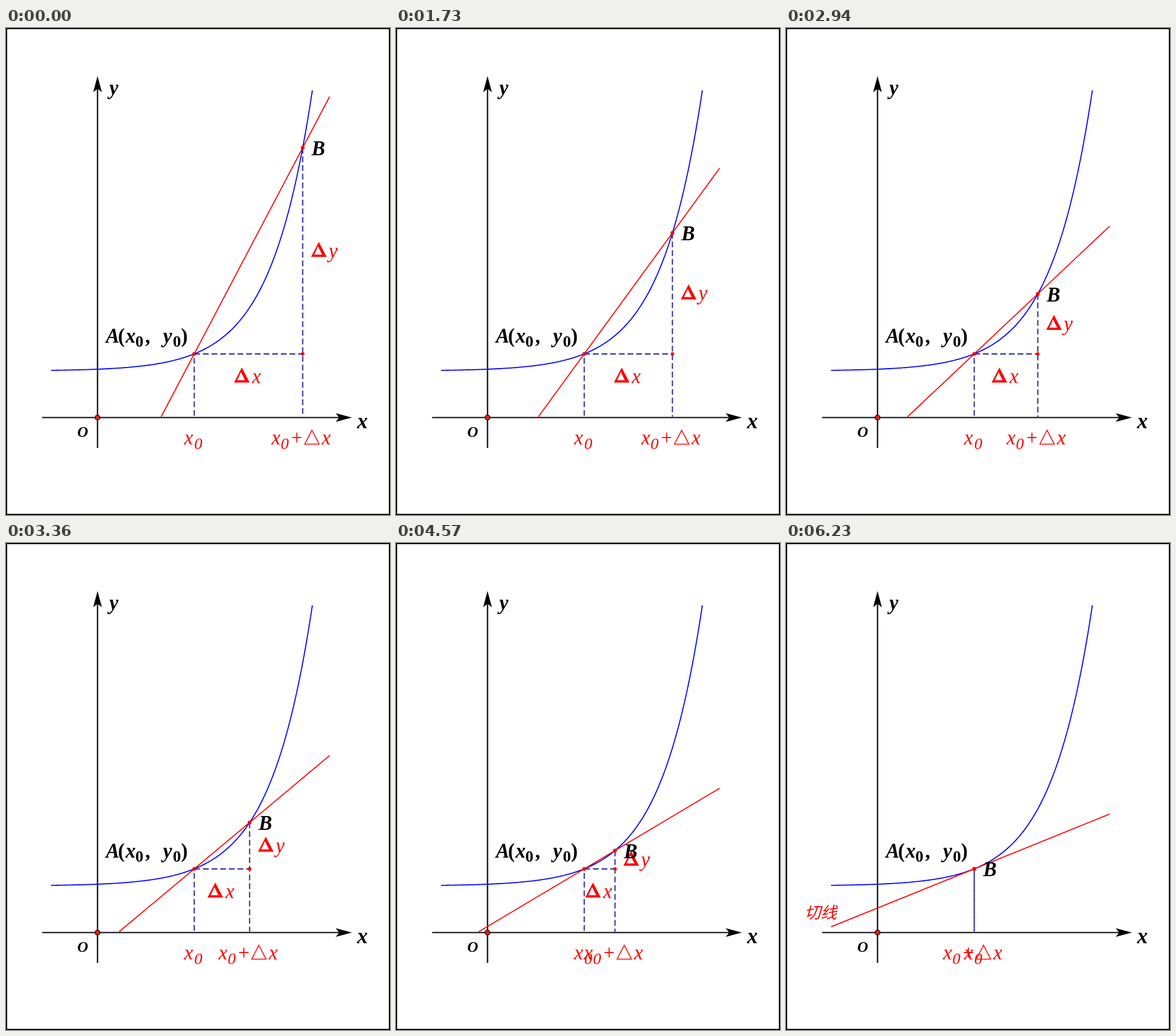
Write an HTML page that moves like this. It is 665 px wide and 842 px high and loops after 6620 ms.

```html
<!DOCTYPE html>
<html lang="zh">
<head>
<meta charset="utf-8">
<title>Secant to tangent</title>
<style>
  html, body { margin: 0; width: 100%; height: 100%; overflow: hidden; background: #fff; }
  svg { display: block; width: 665px; height: 842px; }
  text { font-family: "Liberation Serif", "Times New Roman", serif; font-size: 35px; white-space: pre; }
  .red { fill: #f00; }
  .it { font-style: italic; }
  .bold { font-weight: bold; }
  .sub { font-size: 28px; }
  .big { font-size: 37px; }
  .origin { font-size: 26px; }
  .cjk { font: italic 28px "Noto Sans CJK SC", "Noto Sans CJK", sans-serif; }
  .axis { stroke: #000; stroke-width: 2.2; }
  .line { fill: none; stroke-width: 1.8; }
  .dash { stroke: #4040a4; stroke-width: 2.3; stroke-dasharray: 10 5; }
</style>
</head>
<body>
<svg viewBox="0 0 665 842">
  <defs>
    <path id="delta" class="red" fill-rule="evenodd" d="M0 0L13.500-26L27 0ZM5.500-4H19L12-18Z"/>
  </defs>
  <rect x="1" y="1" width="663" height="840" fill="#fff" stroke="#000" stroke-width="2"/>

  <path id="dropA" class="dash" stroke-dashoffset="7.5" d="M326 563V672"/>
  <path id="dropB" class="dash"/>
  <path id="run" class="dash"/>

  <path class="axis" d="M62.500 673.500H585M158.500 726V100"/>
  <path d="M158.500 83L166 111L158.500 105L151 111Z"/>
  <path d="M599 673.500L571 681L577 673.500L571 666Z"/>

  <path id="curve" class="line" stroke="#00f"/>
  <path id="secant" class="line" stroke="#f00"/>

  <circle class="red" cx="326" cy="563.5" r="3.3"/>
  <circle id="corner" class="red" cy="563.5" r="3"/>
  <circle id="dotB" class="red" r="3.3"/>
  <circle cx="158.500" cy="673.500" r="4.3" fill="#d8201c" stroke="#300" stroke-width="1.3"/>

  <g class="bold">
    <text class="it" x="179" y="115">y</text>
    <text class="it big" x="608" y="692">x</text>
    <text class="it origin" x="123.500" y="707">O</text>
    <text class="it" x="173" y="544">A</text>
    <text x="194" y="544">(</text>
    <text class="it" x="207" y="544">x</text>
    <text class="sub" x="224" y="551">0</text>
    <text x="241" y="544">,</text>
    <text class="it" x="272" y="544">y</text>
    <text class="sub" x="289" y="551">0</text>
    <text x="303" y="544">)</text>
  </g>

  <g class="red">
    <text class="it" x="308.500" y="720">x</text>
    <text class="it sub" x="326" y="728">0</text>
    <g id="sum">
      <text class="it" x="-54" y="720">x</text>
      <text class="it sub" x="-38" y="728">0</text>
      <text x="-20" y="720">+</text>
      <path d="M3.500 719.500L16 695.500L28.500 719.500Z" fill="none" stroke="#f00" stroke-width="1.6"/>
      <text class="it" x="33" y="720">x</text>
    </g>
    <g id="dx">
      <use href="#delta" x="-25"/>
      <text class="it" x="6" y="1">x</text>
    </g>
    <g id="dy">
      <use href="#delta" x="14.500"/>
      <text class="it" x="45" y="1">y</text>
    </g>
    <text id="tangent" class="cjk" x="32" y="649">切线</text>
  </g>
  <text id="labelB" class="bold it">B</text>
</svg>
<script>
  const LOOP = 6620;
  const STEPS = [100, 1310, 1730, 2130, 2520, 2940, 3360, 3780, 4180, 4570, 4990, 5410, 5830, 6230];
  const LAST = STEPS.length;
  const A = { x: 326, y: 563.4 };
  const RISE = 29.5;
  const GROWTH = 0.01369;
  const BASE = 672;

  const el = id => document.getElementById(id);
  const set = (id, attrs) => {
    for (const name in attrs) el(id).setAttribute(name, attrs[name]);
  };
  const move = (id, x, y) => set(id, { transform: `translate(${x} ${y})` });
  const show = (id, on) => set(id, { visibility: on ? "visible" : "hidden" });
  const curveY = x => A.y + RISE * (1 - Math.exp(GROWTH * (x - A.x)));

  const points = [];
  for (let x = 78; x <= 530.5; x += 2.5) points.push(`${x} ${curveY(x).toFixed(2)}`);
  points.push("530.5 110.5");
  set("curve", { d: "M" + points.join("L") });

  // B slides left by equal steps until it meets A.
  const stepX = k => k === 0 ? 513.8 : k === LAST ? A.x : 521.3 - 14.2 * k;

  function pose(k) {
    const x = stepX(k);
    const y = curveY(x);
    const atA = k === LAST;
    const slope = atA ? RISE * GROWTH : (A.y - y) / (x - A.x);
    const left = Math.max(78, A.x - (BASE - A.y) / slope);
    const lineY = px => A.y - slope * (px - A.x);

    set("secant", { d: `M${left} ${lineY(left)}L560.5 ${lineY(560.5)}` });
    set("dropB", { d: `M${x} ${y}V${BASE}` });
    set("run", { d: `M${A.x} 563.5H${x}` });
    set("dotB", { cx: x, cy: y });
    set("corner", { cx: x });
    set("labelB", { x: x + 15.5, y: y + 13 });
    move("sum", x, 0);
    move("dx", (A.x + x) / 2, 613);
    move("dy", x, (A.y + y) / 2 + 10.5);
    show("dx", !atA);
    show("dy", !atA);
    show("tangent", atA);
  }

  let shown = -1;
  function tick() {
    const t = performance.now() % LOOP;
    const k = STEPS.filter(s => s <= t).length;
    if (k !== shown) pose(shown = k);
    requestAnimationFrame(tick);
  }
  tick();
</script>
</body>
</html>
```
